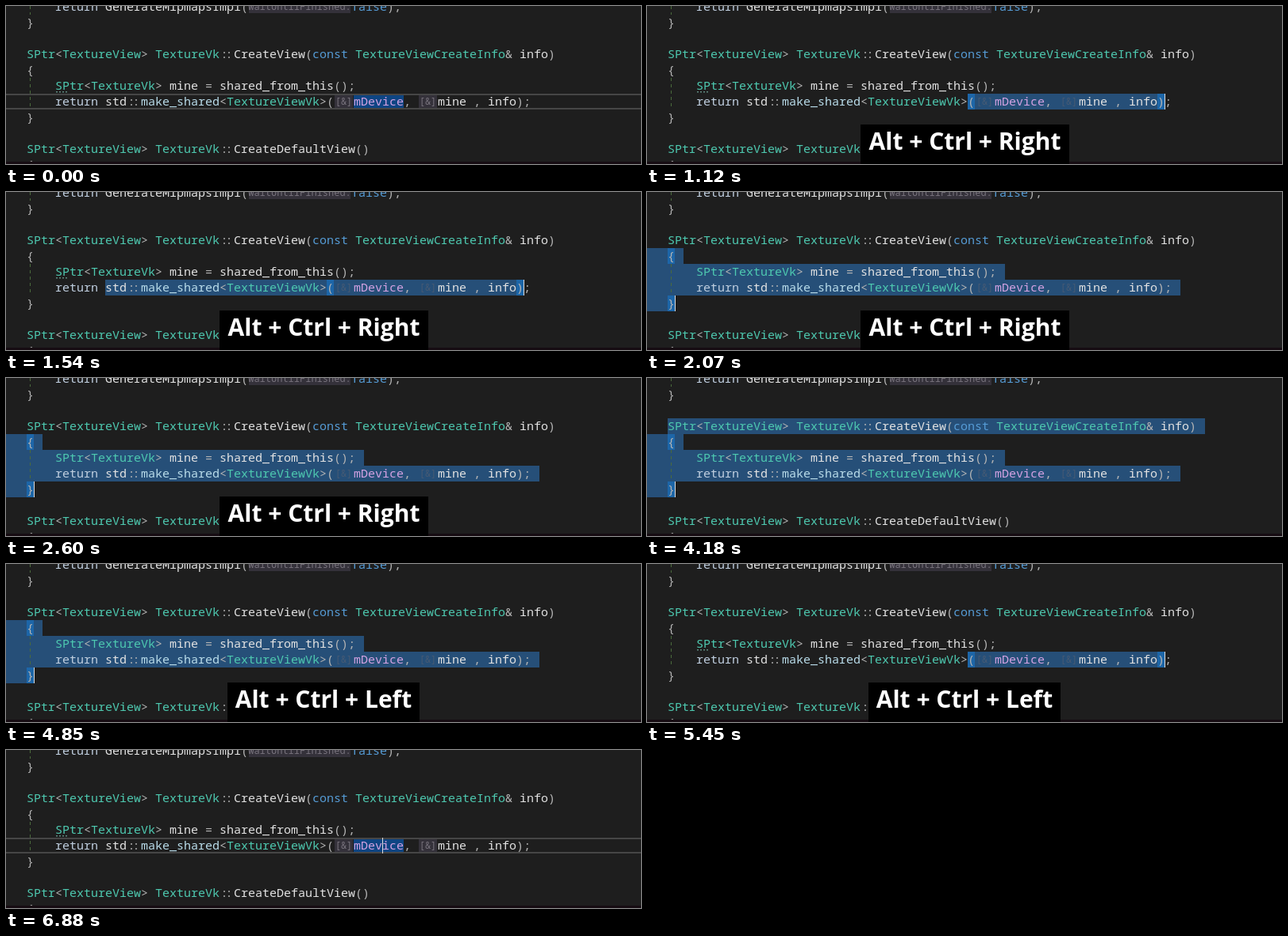
Write an HTML page that moves like this. It is 800 px wide and 200 px high and loops after 7110 ms.

```html
<!DOCTYPE html>
<html lang="en">
<head>
<meta charset="utf-8">
<title>Expand selection</title>
<style>
html, body { margin: 0; width: 100%; height: 100%; overflow: hidden; background: #1e1e1e; }
svg { display: block; width: 800px; height: 200px; }
text { white-space: pre; }
.code { font: 15px "Noto Sans Mono", "DejaVu Sans Mono", monospace; }
.type { fill: #4ec9b0; }
.key { fill: #569cd6; }
.ret { fill: #c0cfe0; }
.name { fill: #e2e2e2; }
.field { fill: #d3a2e2; }
.tmpl { fill: #b9dcea; }
.punct { fill: #b4b4b4; }
.hint rect { fill: #34313a; }
.hint text { font: 12px "Noto Sans Mono", "DejaVu Sans Mono", monospace; fill: #77727c; }
.hint.selected rect { fill: none; }
.hint.selected text { fill: #465a74; }
.keys { font: 700 30px "Open Sans", "Noto Sans", sans-serif; fill: #fff; text-anchor: middle; }
</style>
</head>
<body>
<svg id="stage" viewBox="0 0 800 200"></svg>
<script>
const LOOP = 7110, CHAR = 9, LEFT = 26;
const stage = document.getElementById('stage');

function add(parent, tag, attrs = {}, content) {
  const node = document.createElementNS('http://www.w3.org/2000/svg', tag);
  for (const name in attrs) node.setAttribute(name, attrs[name]);
  if (content) node.textContent = content;
  parent.appendChild(node);
  return node;
}
const rect = (parent, x, y, width, height, fill) =>
  add(parent, 'rect', { x, y, width, height, fill });
const show = (node, on) => { node.style.display = on ? '' : 'none'; };
const rowTop = row => row * 20 - 9;

rect(stage, 0, 0, 800, 200, '#1e1e1e');

// Selection spans are [row, from, to]; braces are [row, x].
const body = [[4, 0, 46], [5, 0, 451], [6, 0, 672]];
const states = [
  { spans: [], braces: [], caret: [6, 474] },
  { spans: [[6, 404, 652]], braces: [[6, 404], [6, 643]], caret: [6, 652] },
  { spans: [[6, 125, 652]], braces: [[6, 404], [6, 643]], caret: [6, 652] },
  { spans: [...body, [7, 0, 35]], braces: [[4, 26], [7, 26]], caret: [7, 35] },
  { spans: [[3, 26, 703], ...body, [7, 0, 35]], braces: [[4, 26], [7, 26]], caret: [7, 35] },
  { spans: [[0, 0, 509], [1, 0, 46], [3, 0, 703], ...body, [7, 0, 46], [9, 0, 469], [10, 0, 46]], braces: [] }
];
for (const state of states) {
  state.layer = add(stage, 'g');
  for (const [row, from, to] of state.spans) rect(state.layer, from, rowTop(row), to - from, 20, '#264f78');
  for (const [row, x] of state.braces) rect(state.layer, x, rowTop(row), CHAR, 20, '#1d66a8');
}
const idle = states[0].layer;
rect(idle, 0, 111, 800, 2, '#464646');
rect(idle, 0, 129, 800, 2, '#464646');
rect(idle, 438, 113, 63, 16, '#0e4583');

// Indent guides
for (const [from, to] of [[0, 11], [91, 131]]) {
  add(stage, 'path', { d: `M30.5 ${from}V${to}`, stroke: '#4a6b3c', 'stroke-dasharray': '4 4', fill: 'none' });
}
const dots = add(stage, 'g');
for (let x = 63; x < 78; x += 4) rect(dots, x, 108, 2, 1.5, '#5f8a80');

// Code
const hints = [];
function hint(x, row, label) {
  const width = label.length > 3 ? 130 : 25, y = rowTop(row);
  const group = add(stage, 'g', { class: 'hint' });
  rect(group, x + 1, y + 2, width - 2, 16);
  add(group, 'text', { x: x + (width - label.length * 7.2) / 2, y: y + 14 }, label);
  hints.push({ group, row });
  return width;
}
function line(row, col, tokens) {
  let x = LEFT + col * CHAR;
  const put = (at, style, str) =>
    add(stage, 'text', { x: at, y: rowTop(row) + 15, class: 'code ' + style }, str);
  for (const [style, str] of tokens) {
    if (style === 'hint') { x += hint(x, row, str); continue; }
    if (str === '::') {
      put(x + 1.5, style, ':');
      put(x + 7.5, style, ':');
    } else put(x, style, str);
    x += str.length * CHAR;
  }
}
const type = s => ['type', s], name = s => ['name', s], punct = s => ['punct', s];
const pointer = s => [type('SPtr'), punct('<'), type(s), punct('> ')];
const method = s => [...pointer('TextureView'), type('TextureVk'), punct('::'), name(s)];
const ret = ['ret', 'return '], ref = ['hint', '[&]'];

line(0, 4, [ret, name('GenerateMipmapsImpl'), punct('('), ['hint', 'waitUntilFinished:'], ['key', 'false'], punct(');')]);
line(1, 0, [punct('}')]);
line(3, 0, [...method('CreateView'), punct('('), ['key', 'const '], type('TextureViewCreateInfo'), punct('& '), name('info'), punct(')')]);
line(4, 0, [punct('{')]);
line(5, 4, [...pointer('TextureVk'), name('mine '), punct('= '), name('shared_from_this'), punct('();')]);
line(6, 4, [ret, name('std'), punct('::'), ['tmpl', 'make_shared'], punct('<'), type('TextureViewVk'), punct('>('),
  ref, ['field', 'mDevice'], punct(', '), ref, name('mine '), punct(', '), name('info'), punct(');')]);
line(7, 0, [punct('}')]);
line(9, 0, [...method('CreateDefaultView'), punct('()')]);
line(10, 0, [punct('{')]);
rect(stage, 0, 197, 800, 3, '#160c12');

const caret = rect(stage, 0, 0, 1, 20, '#dcdcdc');

// Shortcut labels
function label(key, x, width) {
  const group = add(stage, 'g');
  rect(group, x, 150, width, 50, '#000');
  add(group, 'text', { x: x + width / 2, y: 182, class: 'keys' }, 'Alt + Ctrl + ' + key);
  return group;
}
const right = label('Right', 269, 263), left = label('Left', 279, 242);

// [time, state]
const steps = [[0, 0], [1040, 1], [1500, 2], [2060, 3], [2700, 4], [3300, 5],
  [3870, 4], [4430, 3], [4900, 2], [5400, 1], [6130, 0]];
const rightTimes = [[990, 1290], [1440, 1790], [1970, 2300], [2500, 2840], [3060, 3390]];
const leftTimes = [[3820, 4180], [4300, 4660], [4800, 5150], [5400, 5690], [5890, 6220]];
const blinkTimes = [[360, 760], [6130, 6480], [6880, LOOP]];
const within = (t, ranges) => ranges.some(([from, to]) => t >= from && t < to);

function draw(t) {
  const index = steps.filter(([at]) => at <= t).pop()[1];
  const state = states[index];
  states.forEach(s => show(s.layer, s === state));
  for (const h of hints) {
    h.group.classList.toggle('selected', state.spans.some(([row]) => row === h.row));
  }
  show(dots, index < 3);
  show(caret, state.caret && (index > 0 || within(t, blinkTimes)));
  if (state.caret) {
    caret.setAttribute('x', state.caret[1]);
    caret.setAttribute('y', rowTop(state.caret[0]));
  }
  show(right, within(t, rightTimes));
  show(left, within(t, leftTimes));
}

const start = performance.now();
function tick() {
  draw((performance.now() - start) % LOOP);
  requestAnimationFrame(tick);
}
tick();
</script>
</body>
</html>
```
